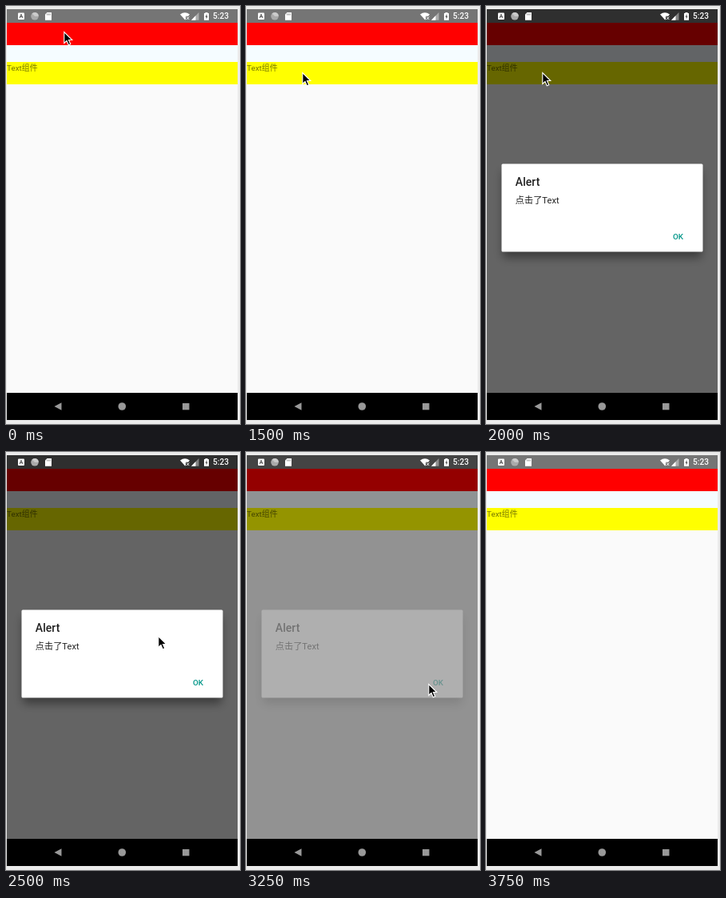
An HTML page for the animation above (4 s loop, 293x523 px).

```html
<!DOCTYPE html>
<html lang="zh">
<head>
<meta charset="utf-8">
<style>
  html, body { margin: 0; width: 100%; height: 100%; overflow: hidden; background: #ebebeb; }
  svg { display: block; font-family: Roboto, "Noto Sans CJK SC", "Noto Sans CJK", sans-serif; }
  .medium { font-weight: 500; }
</style>
</head>
<body>
<svg width="293" height="523" viewBox="0 0 293 523">
  <defs>
    <filter id="blur" x="-20%" y="-30%" width="140%" height="160%">
      <feGaussianBlur stdDeviation="6"/>
    </filter>
  </defs>

  <!-- Page -->
  <path fill="#fafafa" d="M1 4H290V484H1Z"/>
  <path fill="#757575" d="M1 4H290V21H1Z"/>
  <path fill="#f00" d="M1 21H290V49H1Z"/>
  <path fill="#f5fcff" d="M1 49H290V70H1Z"/>
  <path fill="#ff0" d="M1 70H290V98H1Z"/>
  <text x="1" y="80.5" font-size="9.9" fill-opacity=".54">Text组件</text>
  <path id="dim" d="M1 4H290V484H1Z"/>

  <!-- Status bar -->
  <g fill="#fff">
    <rect x="15" y="8.5" width="8" height="8.5" rx="1"/>
    <path d="M17 15L19 10.3L21 15M17.8 13.5H20.2" fill="none" stroke="#555"/>
    <circle cx="36" cy="12.8" r="4.8" fill="#aaa"/>
    <path d="M32.5 9.5A4.8 4.8 0 0 1 40.8 12.8L36 12.8Z" fill="#ccc"/>
    <path d="M51.5 8H57V17.7H49V10.5Z"/>
    <path d="M51.6 9.5V11.5M53.4 9.5V11.5M55.2 9.5V11.5" stroke="#777" stroke-width=".8"/>
    <path d="M218 10.5Q224 6.2 230 10.5L228.2 12.8H225V16.8L224.3 17.6Z"/>
    <path d="M226 13.5L229.3 17M229.3 13.5L226 17" stroke="#fff"/>
    <path d="M241.5 8V17.7H232Z" fill-opacity=".4"/>
    <path d="M237.5 12.1V17.7H232Z"/>
    <path d="M249.5 8H252.5V9H254V17.7H248V9H249.5Z"/>
    <path d="M251.5 10L249.5 13.8H250.7V16.5L252.6 12.8H251.5Z" fill="#555"/>
    <text class="medium" x="259" y="16.3" font-size="10.1">5:23</text>
  </g>

  <!-- Navigation bar -->
  <path d="M1 484H290V518H1Z"/>
  <g fill="#999">
    <path d="M60.5 501L69.5 496.2V505.8Z"/>
    <circle cx="145.3" cy="501" r="4.8"/>
    <path d="M221 497H229.5V505.3H221Z"/>
  </g>

  <g id="dialog">
    <rect x="21" y="206" width="249" height="109" rx="2" fill-opacity=".4" filter="url(#blur)"/>
    <rect x="19.5" y="197.5" width="252" height="110" rx="1.5" fill="#fff"/>
    <text class="medium" x="36.8" y="225" font-size="14.1" fill-opacity=".87">Alert</text>
    <text x="36.8" y="246.5" font-size="11.2" fill-opacity=".87">点击了Text</text>
    <text class="medium" x="234" y="291.8" font-size="9.9" fill="#009688">OK</text>
  </g>

  <path id="cursor" d="M.8 1.5V15.5L4 12.5L6.3 17.8L8.8 16.7L6.5 11.5H10.8Z" stroke="#fff" stroke-width="1.1"/>
</svg>
<script>
  const LOOP = 4000, STEP = 250;
  const $ = id => document.getElementById(id);

  // [start ms, x, y]
  const cursorStops = [
    [0, 72, 31], [250, 71, 34], [1000, 71, 35], [1250, 70, 80], [1500, 70, 82],
    [2250, 93, 103], [2500, 190, 229], [2750, 217, 285], [3000, 228, 289],
    [3500, 130, 97]
  ];
  // [start ms, dim opacity, dialog opacity]
  const fadeStops = [
    [0, 0, 0], [1750, .3, .97], [2000, .6, 1], [3250, .42, .27], [3500, 0, 0]
  ];
  const at = (stops, t) => stops.findLast(stop => stop[0] <= t);

  function draw(now) {
    const t = Math.floor(now % LOOP / STEP) * STEP;
    const [, x, y] = at(cursorStops, t);
    const [, dim, dialog] = at(fadeStops, t);
    $("cursor").setAttribute("transform", `translate(${x} ${y})`);
    $("cursor").setAttribute("opacity", t < 3750 ? 1 : 0);
    $("dim").setAttribute("opacity", dim);
    $("dialog").setAttribute("opacity", dialog);
  }

  const start = performance.now();
  function tick() {
    draw(performance.now() - start);
    requestAnimationFrame(tick);
  }
  tick();
</script>
</body>
</html>
```
